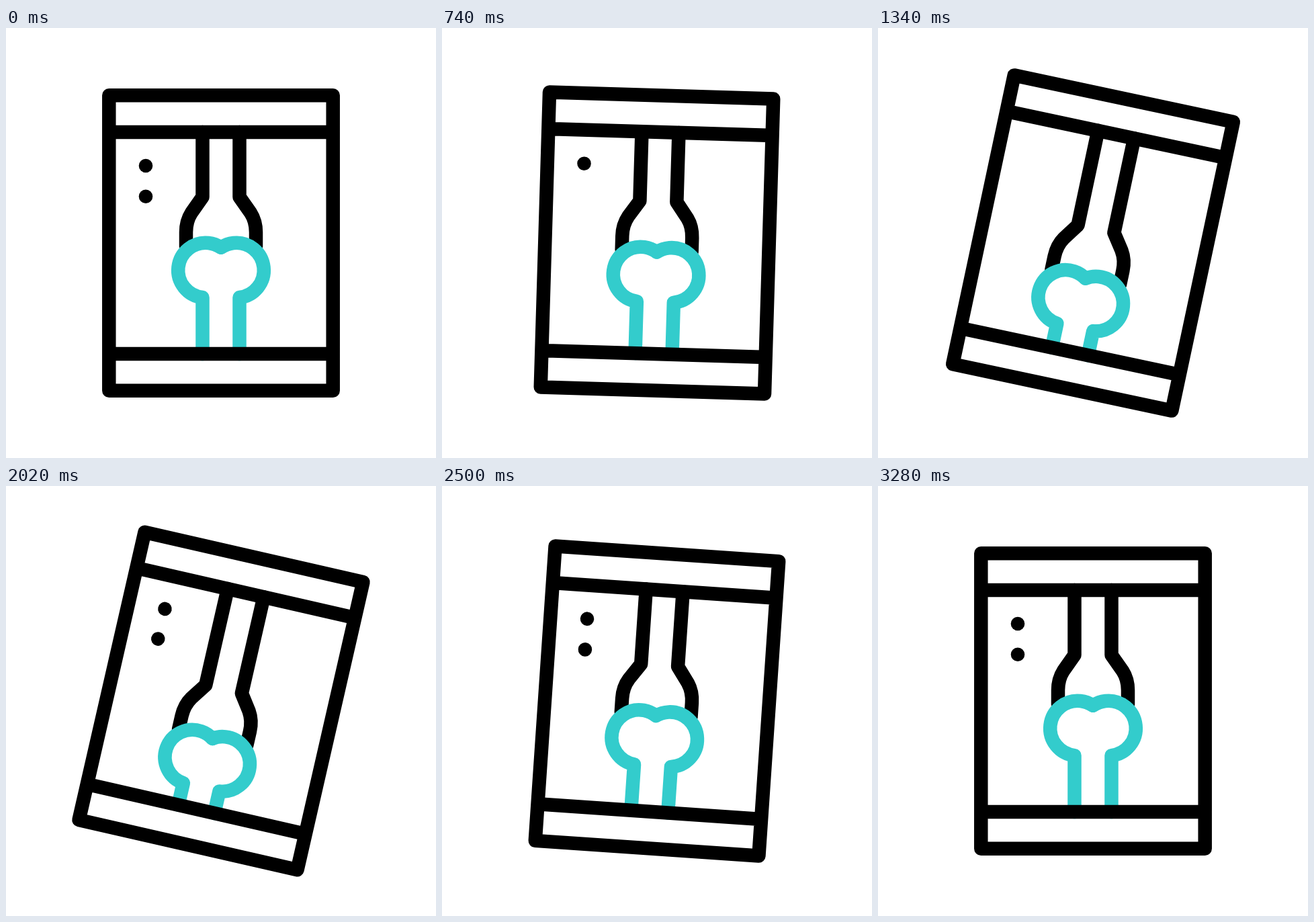
Animation of 640x640 px, one loop 3600 ms. Source, as an HTML page with a canvas:

```html
<!DOCTYPE html>
<html lang="en">
<head>
<meta charset="utf-8">
<title>X-ray</title>
<style>
  html, body { margin: 0; width: 100%; height: 100%; overflow: hidden; background: #fff; }
  canvas { display: block; width: 640px; height: 640px; }
</style>
</head>
<body>
<canvas id="stage" width="640" height="640"></canvas>
<script>
const ctx = document.getElementById('stage').getContext('2d');
const LOOP = 3600;
const MAX_TILT = 13 * Math.PI / 180;
const DROP = 51;
const BLACK = '#000';
const TEAL = '#33cccc';

// Cubic ease with flat ends; x1 and x2 are the handle positions in time
function ease(u, x1, x2) {
  if (u <= 0) return 0;
  if (u >= 1) return 1;
  let lo = 0, hi = 1;
  for (let i = 0; i < 30; i++) {
    const s = (lo + hi) / 2, r = 1 - s;
    const x = 3 * r * r * s * x1 + 3 * r * s * s * x2 + s * s * s;
    if (x < u) lo = s; else hi = s;
  }
  return lo * lo * (3 - 2 * lo);
}

function tiltAt(t) {
  return ease((t - 400) / 1500, 0.515, 0.044) - ease((t - 1880) / 1440, 0.65, 0.02);
}

function stroke(color, build) {
  ctx.strokeStyle = color;
  ctx.beginPath();
  build();
  ctx.stroke();
}

function mirrored(draw) {
  draw();
  ctx.save();
  ctx.translate(640, 0);
  ctx.scale(-1, 1);
  draw();
  ctx.restore();
}

function dot(y) {
  ctx.fillStyle = BLACK;
  ctx.beginPath();
  ctx.arc(208, y, 10.3, 0, 2 * Math.PI);
  ctx.fill();
}

function upperBone(d) {
  stroke(BLACK, () => {
    ctx.moveTo(292.5, 155);
    ctx.lineTo(292.5, 251.5 + d);
    ctx.lineTo(276, 275 + d);
    ctx.quadraticCurveTo(268, 287.5 + d, 268, 304 + d);
    ctx.lineTo(268, 325 + d);
  });
}

function lowerBone(d) {
  const cx = 297, cy = 360.5 + d, r = 40.8;
  const from = Math.acos((292.5 - cx) / r);
  const to = 2 * Math.PI - Math.acos((320 - cx) / r);
  stroke(TEAL, () => {
    ctx.moveTo(292.5, 485);
    ctx.arc(cx, cy, r, from, to);
  });
}

function panel() {
  stroke(BLACK, () => {
    ctx.rect(153.3, 100.3, 333.4, 439.4);
    for (const y of [155, 485]) {
      ctx.moveTo(153.3, y);
      ctx.lineTo(486.7, y);
    }
  });
}

function draw(t) {
  const k = tiltAt(t);
  ctx.setTransform(1, 0, 0, 1, 0, 0);
  ctx.fillStyle = '#fff';
  ctx.fillRect(0, 0, 640, 640);
  ctx.translate(320, 320);
  ctx.rotate(k * MAX_TILT);
  ctx.translate(-320, -320);
  ctx.lineWidth = 20.5;
  ctx.lineJoin = ctx.lineCap = 'round';

  mirrored(() => upperBone(k * DROP));
  mirrored(() => lowerBone(k * DROP));
  panel();
  if (t < 900 || t >= 1500) dot(205);
  if (t < 580 || t >= 1700) dot(250.8);
}

const start = performance.now();
function tick() {
  draw((performance.now() - start) % LOOP);
  requestAnimationFrame(tick);
}
tick();
</script>
</body>
</html>
```
